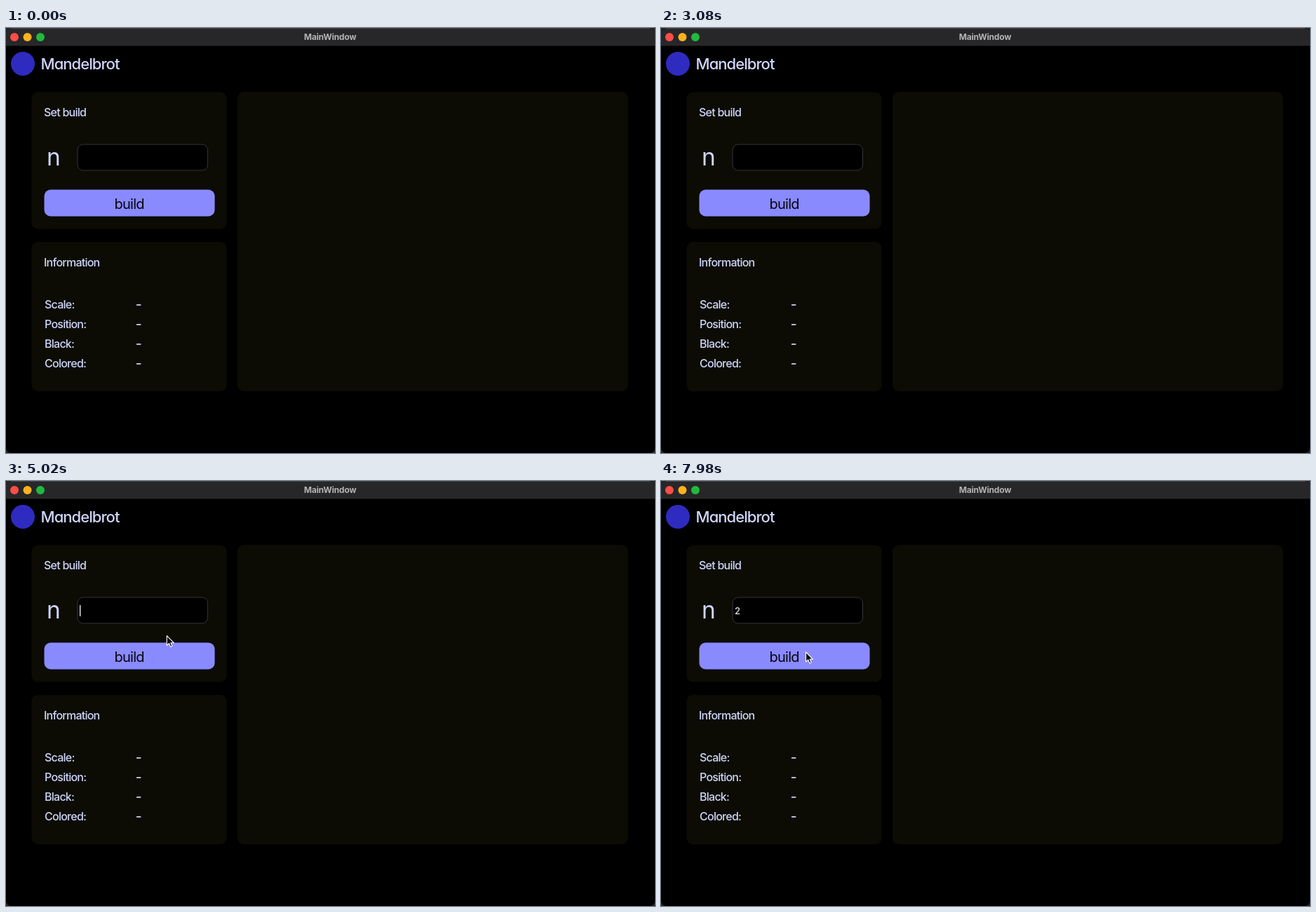
Write an HTML page that moves like this. It is 925 by 606 pixels and loops after 8 s.

```html
<!DOCTYPE html>
<html lang="en">
<head>
<meta charset="utf-8">
<title>MainWindow</title>
<style>
  html, body { margin: 0; width: 100%; height: 100%; overflow: hidden; background: #242426; }
  svg { display: block; width: 925px; height: 606px; }
  text { font: 500 16px Inter, Roboto, sans-serif; letter-spacing: -.75px; fill: #d0d6fa; white-space: pre; }
  .bar { font-size: 12px; font-weight: 700; letter-spacing: -.2px; fill: #b4b4b4; text-anchor: middle; }
  .name { font-size: 22px; letter-spacing: -.95px; font-feature-settings: "cv11"; }
  .var { font-size: 33.5px; font-weight: 400; letter-spacing: 0; }
  .btn { font-size: 20px; font-weight: 400; letter-spacing: -.75px; fill: #050510; }
  .num { font-size: 13px; letter-spacing: 0; fill: #e4e4ea; }
  .panel { fill: #0c0c04; }
</style>
</head>
<body>
<svg viewBox="0 0 925 606">
  <rect width="925" height="606" rx="8"/>
  <path d="M0 25.5V8Q0 0 8 0H917Q925 0 925 8V25.5Z" fill="#27272a"/>
  <rect x="7" width="911" height="1" fill="#48484a"/>
  <circle cx="12" cy="13" r="6" fill="#ff4d46"/>
  <circle cx="30.5" cy="13" r="6" fill="#ffb21c"/>
  <circle cx="49" cy="13" r="6" fill="#20ba3c"/>
  <text class="bar" x="462" y="17">MainWindow</text>

  <circle cx="24" cy="51" r="17" fill="#2f2bc0"/>
  <text class="name" x="49.5" y="58.5">Mandelbrot</text>

  <rect class="panel" x="36.5" y="91.5" width="278" height="195" rx="9"/>
  <rect class="panel" x="36.5" y="305" width="278" height="213" rx="9"/>
  <rect class="panel" x="330" y="91" width="556.5" height="427" rx="9"/>

  <text x="54" y="126">Set build</text>
  <text class="var" x="58" y="196">n</text>
  <rect x="102" y="166" width="185.5" height="37" rx="8" stroke="#34343e"/>
  <rect x="54.5" y="230.5" width="243" height="38" rx="9" fill="#8a8aff"/>
  <text class="btn" x="154.5" y="257.5">build</text>

  <text x="54" y="340">Information</text>
  <g id="rows"></g>

  <text id="digit" class="num" x="105" y="189.5">2</text>
  <rect id="caret" x="105" y="177" width="1.3" height="16" fill="#f4f4f4"/>
  <path id="mouse" d="M0 0V14.5L3.4 11.4L5.7 16.6L8.1 15.5L5.9 10.6H10.4Z"
        fill="#000" stroke="#fff" stroke-width="1.2" stroke-linejoin="round"/>
</svg>
<script>
  const LOOP = 8000, BLINK = 1400, TYPED = 6900;
  const $ = id => document.getElementById(id);

  $("rows").innerHTML = ["Scale:", "Position:", "Black:", "Colored:"].map((label, i) => {
    const y = 400 + i * 28;
    return `<text x="55" y="${y}">${label}</text><rect x="186" y="${y - 6}" width="6.3" height="1.7" fill="#d0d6fa"/>`;
  }).join("");

  // time, x, y of the pointer tip
  const path = [
    [3700, 400, 606], [4180, 269.5, 309.5], [4800, 234, 232], [5300, 222.5, 204.5],
    [7200, 222.5, 204.5], [7800, 206.5, 244], [8000, 206.5, 244]
  ];

  function pointerAt(t) {
    if (t < path[0][0]) return null;
    const i = path.findIndex(p => p[0] > t);
    const [t0, x0, y0] = path[i - 1], [t1, x1, y1] = path[i];
    const k = (t - t0) / (t1 - t0), e = k * k * (3 - 2 * k);
    return [x0 + (x1 - x0) * e, y0 + (y1 - y0) * e];
  }

  function caretOn(t) {
    if (t >= TYPED) return t < TYPED + BLINK / 2;
    const phase = (t - 370 + BLINK) % BLINK;
    return phase < BLINK / 2;
  }

  const show = (el, on) => el.setAttribute("visibility", on ? "visible" : "hidden");

  function draw(t) {
    const typed = t >= TYPED, pos = pointerAt(t);
    show($("digit"), typed);
    show($("caret"), caretOn(t));
    $("caret").setAttribute("x", typed ? 114 : 105);
    show($("mouse"), pos);
    if (pos) $("mouse").setAttribute("transform", `translate(${pos}) scale(.95)`);
  }

  const start = performance.now();
  function tick() {
    draw((performance.now() - start) % LOOP);
    requestAnimationFrame(tick);
  }
  tick();
</script>
</body>
</html>
```
